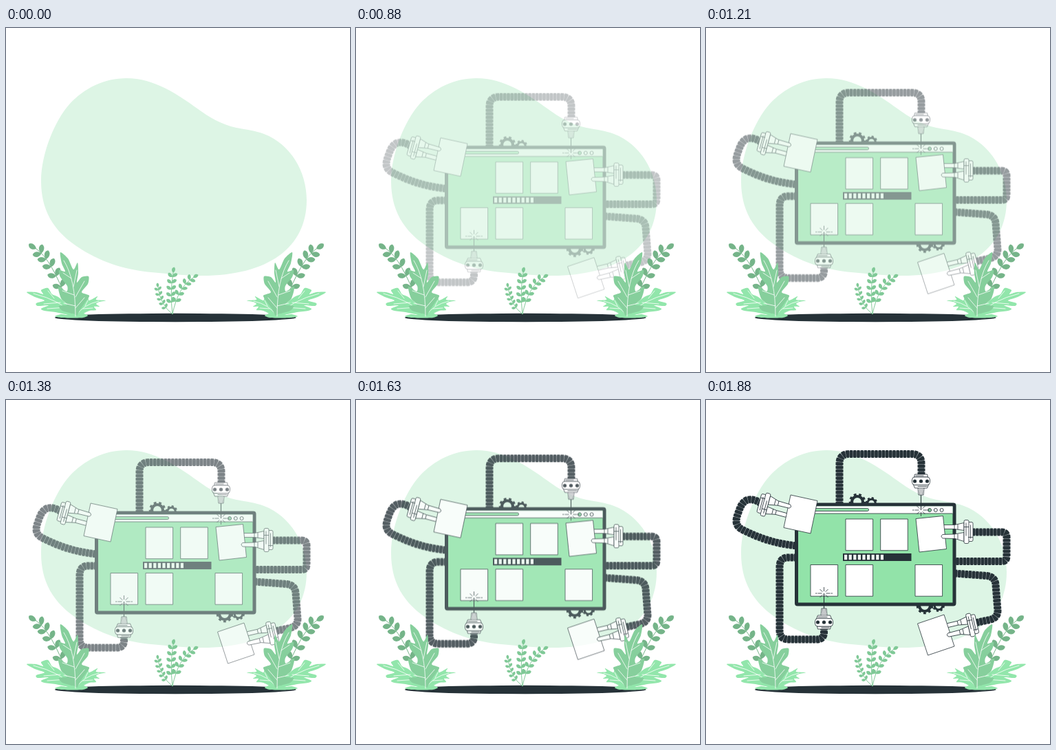
An HTML page for the animation above (1.93 s loop, 500 px wide and 500 px high).

```html
<!DOCTYPE html>
<html lang="en">
<head>
<meta charset="utf-8">
<title>Build in progress</title>
<style>
  html, body { margin: 0; width: 100%; height: 100%; overflow: hidden; background: #fff; }
  svg { display: block; width: 100vw; height: 100vh; }
  .ink { fill: #263238; }
  .line { fill: #fff; stroke: #263238; stroke-width: .8; stroke-linejoin: round; }
  .hair { fill: none; stroke: #263238; stroke-width: .8; }
  .vein { fill: none; stroke: #fff; stroke-width: .8; stroke-linecap: round; }
</style>
</head>
<body>
<svg viewBox="0 0 500 500">
  <path fill="#ddf5e5" d="M175 73C216 73 250 97 278 117C296 130 312 140 335 145C350 148 362 149 375 154C414 169 437 209 437 250C437 320 380 360 285 360C262 360 245 358 222 356C178 353 142 342 110 322C66 295 51 262 51 222C51 182 72 133 92 111C114 87 143 73 175 73Z"/>
  <g id="machine"></g>
  <ellipse class="ink" cx="246.300" cy="421" rx="175.500" ry="6.200"/>
  <g id="plants"></g>
</svg>
<script>
const INK = '#263238', GREEN = '#92e3a9';
const LOOP = 1930, STEP = 1000 / 24, RISE = 45 * STEP;

const path = (d, attrs) => `<path d="${d}" ${attrs}/>`;
const rect = (x, y, w, h, attrs, r = 0) =>
  `<rect x="${x}" y="${y}" width="${w}" height="${h}" rx="${r}" ${attrs}/>`;
const dot = (x, y, r, attrs) => `<circle cx="${x}" cy="${y}" r="${r}" ${attrs}/>`;
const place = (x, y, turn, body) => `<g transform="translate(${x} ${y}) rotate(${turn})">${body}</g>`;
const range = (n, fn) => Array.from({ length: n }, (_, i) => fn(i)).join('');

// Closed rounded outline through "x,y x,y ..." points
function outline(text, fill, k = 0.13) {
  const p = text.split(' ').map(s => s.split(',').map(Number)), n = p.length;
  let d = `M${p[0]}`;
  for (let i = 0; i < n; i++) {
    const a = p[(i + n - 1) % n], b = p[i], c = p[(i + 1) % n], e = p[(i + 2) % n];
    d += `C${b[0] + (c[0] - a[0]) * k} ${b[1] + (c[1] - a[1]) * k} ` +
         `${c[0] - (e[0] - b[0]) * k} ${c[1] - (e[1] - b[1]) * k} ${c}`;
  }
  return path(d + 'Z', `fill="${fill}"`);
}

// Curved stem with pairs of leaves and one at the tip
function sprig([x0, y0, cx, cy, x1, y1], pairs, size, from, to, color) {
  const leaf = (x, y, turn, s) => place(x, y, turn,
    path(`M0 0C${s * .3} ${-s * .45} ${s * .85} ${-s * .42} ${s} 0C${s * .85} ${s * .32} ${s * .35} ${s * .36} 0 0Z`, `fill="${color}"`));
  let out = path(`M${x0} ${y0}Q${cx} ${cy} ${x1} ${y1}`, `fill="none" stroke="${color}" stroke-width="1"`);
  for (let i = 0; i < pairs; i++) {
    const t = from + (to - from) * i / (pairs - 1), u = 1 - t;
    const x = u * u * x0 + 2 * u * t * cx + t * t * x1;
    const y = u * u * y0 + 2 * u * t * cy + t * t * y1;
    const dir = Math.atan2(u * (cy - y0) + t * (y1 - cy), u * (cx - x0) + t * (x1 - cx)) * 180 / Math.PI;
    out += leaf(x, y, dir - 56, size) + leaf(x, y, dir + 48, size);
  }
  const end = Math.atan2(y1 - cy, x1 - cx) * 180 / Math.PI;
  return out + leaf(x1, y1, end, size);
}

function bush() {
  const light = '#92e6ab', mid = '#86cf9c';
  return sprig([90, 400, 66, 336, 44, 321], 5, 13, .2, .83, '#75b489') +
    outline('30,384 44,384 54,387 51,381 61,378 67,387 76,391 90,403 101,419 86,416 72,413 56,411 51,408 62,403 46,404 44,400 56,396 42,391', light) +
    outline('145,396 136,398 131,401 136,405 128,405 131,410 121,411 111,416 102,420 107,405 113,398 119,390 121,396 133,390 131,395', light) +
    path('M40 386Q80 396 100 418M70 393L61 382M79 399L55 401M88 406L60 408M135 397Q112 402 102 418M115 404L119 396M112 408L126 407', 'class="vein"') +
    outline('79,326 90,335 98,351 104,341 105,356 103,370 110,362 120,361 119,372 110,384 121,389 115,399 108,409 102,420 95,415 82,411 77,404 89,402 80,393 76,376 88,383 89,375 79,362 77,352 86,354 81,342', mid) +
    outline('71,419 80,416 89,417 97,415 104,418 112,415 119,418 112,421 95,421.500 80,421', light) +
    path('M84 338Q101 365 101 419M95 364L83 356M98 376L103 352M99 388L82 382M101 391L114 368M101 404L84 400M101 407L114 392', 'class="vein"');
}

function hose(d) {
  const band = (color, width, dash, shift = 0) =>
    path(d, `fill="none" stroke="${color}" stroke-width="${width}" stroke-dasharray="${dash}" stroke-dashoffset="${shift}"`);
  return band(INK, 8.5, 'none') + band(INK, 11, '4.1 1.1') + band('#a9b0b3', 10, '.5 4.7', -4.4);
}

function gear(x, y, r, teeth) {
  const pitch = 2 * Math.PI * r / teeth;
  return dot(x, y, r * .76, `fill="none" stroke="${INK}" stroke-width="${r * .4}"`) +
    dot(x, y, r, `fill="none" stroke="${INK}" stroke-width="${r * .34}" stroke-dasharray="${pitch / 2}"`);
}

function welder(x, y, turn) {
  const rays = range(8, i => {
    const a = i * Math.PI / 4, far = i % 4 === 0 ? 12.5 : i % 2 ? 8.5 : 9;
    const c = Math.cos(a), s = Math.sin(a);
    return path(`M${c * 3} ${42 + s * 3}L${c * far} ${42 + s * far}`,
      `class="hair" ${i % 4 ? '' : 'stroke-dasharray="6 1"'}`);
  });
  return place(x, y, turn,
    path('M0 20V42', `stroke="${INK}" stroke-width="1.100"`) + rays +
    path('M-4.500 9H4.500L3.500 20H-3.500Z', 'class="line"') + path('M-1.500 11V19M1.500 11V19', 'class="hair"') +
    path('M-10 -6L-9 -10H9L10 -6ZM-11 5L-9 10H9L11 5Z', 'class="line"') +
    path('M-5 7.500H9M-8 -8H4', 'class="hair"') +
    rect(-13, -6, 26, 11.5, 'class="line"', 4) +
    range(3, i => dot(i * 9 - 9, 0, 2.6, 'class="ink"')));
}

// The gripped sheet sits between the two fingers
function claw(x, y, turn, sheet) {
  const part = body => place(x, y, turn, body);
  return part(path('M-4 -13L-13 -11L-18 -10H-33Q-37 -7 -33 -4H-18L-4 -2Z', 'class="line"')) +
    path(`M${sheet}Z`, 'class="line"') +
    part(path('M-4 1L-18 3.500L-35 4Q-39 6.500 -35 9.500L-17 10L-4 14Z', 'class="line"') +
      path('M-18 -10V-4M-13 -11V-3M-18 3.500V10M-13 3V11', 'class="hair"') +
      rect(2, -14, 7, 28, 'class="line"', 2) + rect(-4, -17, 7, 34, 'class="line"', 2) +
      path('M-1 -13V6M5.500 -10V10M-4 -7H3M2 8H9', 'class="hair"'));
}

const hoses = [
  'M194 152V92Q194 78.500 208 78.500H299Q313 78.500 313 92V109',
  'M80 150C62 139 53 146 48 161C43 174 40 183 56 190C80 202 103 209 132 212',
  'M132 229H119Q107 229 107 243V335Q107 348 120 348H160Q171.500 348 171.500 338V332',
  'M387 192H430Q437 192 437 199V227Q437 234.500 430 234.500H361',
  'M361 252L408 255.500Q420 257 421 268L424 306Q424 317 412 319.500L391 324'
];
const tiles = [[203, 173], [253.7, 173], [152, 239.5], [203, 239.5], [304, 239.5]];

const machine = document.getElementById('machine');
machine.innerHTML =
  gear(220, 148, 10.5, 9) + gear(240.5, 150, 7.6, 8) +
  gear(318, 299, 10.5, 9) + gear(338, 299, 7.6, 8) +
  hoses.map(hose).join('') +
  rect(131.5, 152, 229.5, 145, `fill="${GREEN}" stroke="${INK}" stroke-width="5"`, 1.5) +
  rect(134, 154.5, 224.5, 10.5, 'fill="#fff"') + path('M134 165H358.500', 'class="hair"') +
  rect(140, 157.6, 96.5, 3.9, `fill="${GREEN}" stroke="${INK}" stroke-width=".8"`, 1.9) +
  range(3, i => dot(325 + i * 8.8, 160, 2.5, `fill="${i ? '#fff' : GREEN}" stroke="${INK}" stroke-width=".9"`)) +
  tiles.map(([x, y]) => rect(x, y, 39.6, 45.7, 'class="line"')).join('') +
  rect(199, 223, 99.5, 11, 'class="ink"') +
  range(9, i => rect(201 + i * 6.6, 224.8, 4.2, 7.4, 'fill="#f1fbf4"')) +
  welder(312.5, 118, 0) + welder(171.5, 323, 180) +
  claw(86, 152, 195, '123 138L162 146.500L152 194L113 185.500') +
  claw(379, 191.5, 0, '305 172.500L344.500 168.500L349.500 216.500L310 221') +
  claw(385, 327, -13, '307.500 325L346 312L361 358L322.500 371');

const shoot = '#80c997';
document.getElementById('plants').innerHTML =
  sprig([242, 416, 238, 385, 243, 356], 5, 8.5, .28, .9, shoot) +
  sprig([242, 416, 224, 402, 221, 377], 5, 6.5, .3, .92, shoot) +
  sprig([242, 416, 250, 376, 272, 363], 5, 8.5, .25, .88, shoot) +
  bush() + `<g transform="translate(495 0) scale(-1 1)">${bush()}</g>`;

const rise = machine.animate(
  [{ opacity: 0, transform: 'translateY(30px)' }, { opacity: 1, transform: 'translateY(0px)' }],
  { duration: RISE, easing: 'ease-in', fill: 'both' });
rise.pause();

// 24 pictures a second, with a short rest before the rise shows
function draw() {
  const k = Math.floor((performance.now() % LOOP) / STEP + 0.1);
  rise.currentTime = Math.min(k < 7 ? Math.min(k, 1) : k, 45) * STEP;
  requestAnimationFrame(draw);
}
draw();
</script>
</body>
</html>
```
